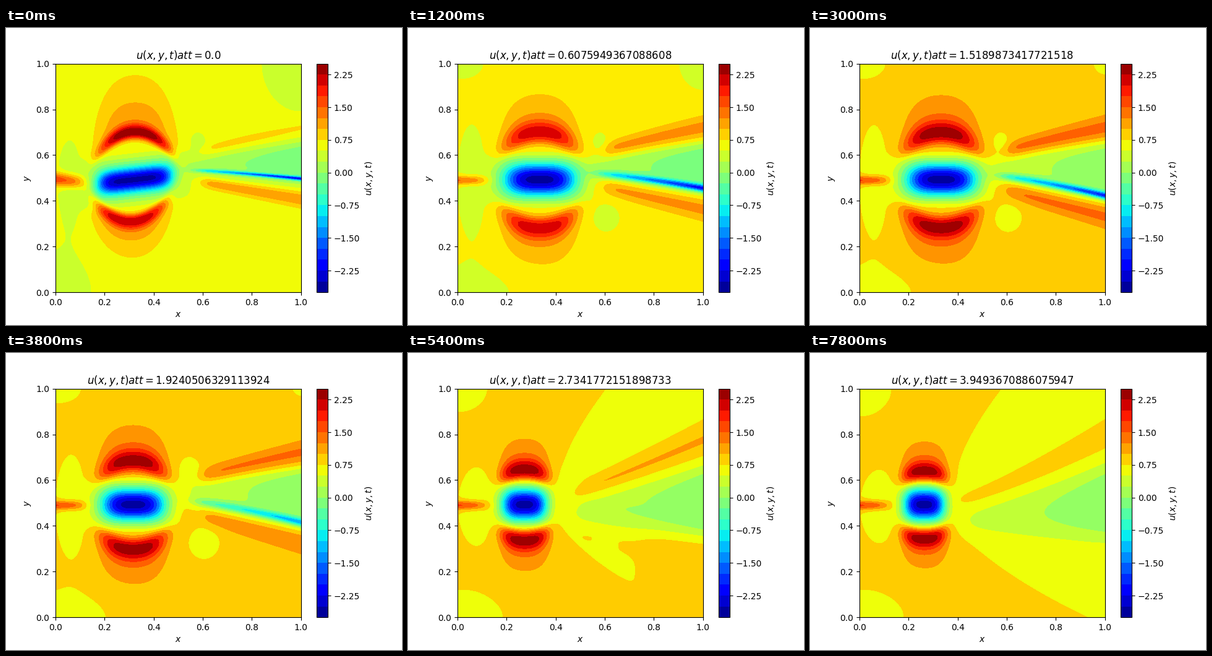
Animation of 640 by 480 pixels, one loop 8 s. Source, as a matplotlib script:

```python
import numpy as np
import matplotlib.pyplot as plt
from matplotlib.animation import FuncAnimation

FRAMES = 40
TIMES = np.linspace(0, 8, 80)

# first frame, lowest level, level step, bands, bottom of the background band
SCALES = [(0, -2.75, 0.25, 21, 0.50), (2, -2.5, 0.25, 20, 0.75),
          (6, -3.0, 0.3, 19, 0.60), (12, -3.0, 0.3, 18, 0.60)]
GAP = 0.13  # background height above its band's lower edge

x, y = np.meshgrid(np.linspace(0, 1, 181), np.linspace(0, 1, 181))


def smooth(k, a, b):
    t = np.clip((k - a) / (b - a), 0, 1)
    return t * t * (3 - 2 * t)


def early(k):
    """Initial transient, dying out."""
    return np.exp(-k / 1.2)


def shrink(k):
    """The central vortex pair contracts."""
    return smooth(k, 13, 31)


def late(k):
    """The wake spreads and reaches back to the core."""
    return smooth(k, 22, 30)


def sag(k):
    """Slow downward drift of the wake's end."""
    return 0.1 * (1 - np.exp(-k / 11))


def mix(a, b, w):
    return a + (b - a) * w


def sig(z):
    return 0.5 * (1 + np.tanh(z / 2))


def dip(cx, cy, rx, ry):
    """Shallow hollow whose visible edge is the ellipse rx, ry."""
    r2 = ((x - cx) / (rx + 1e-3)) ** 2 + ((y - cy) / (ry + 1e-3)) ** 2
    return -2 * GAP * 0.5 ** r2


def core(k, drop):
    e, s = early(k), shrink(k)
    cx = mix(0.335, 0.264, s) - 0.012 * e
    ax = mix(0.145, 0.082, s) + 0.01 * e
    ay = mix(0.07, 0.068, s) - 0.015 * e
    dx = np.abs(x - cx)
    dy = np.abs(y - 0.493 - 0.12 * e * np.clip(x - cx, -0.2, 0.2))
    blob = np.exp(-(dx / ax) ** (3.2 + 2.5 * e) - (dy / ay) ** 2.2)
    skirt = np.exp(-(dx / (1.4 * ax)) ** 6 - (dy / 0.11) ** 6)
    return -(drop - 0.5) * blob - 0.5 * skirt


def lobe(k, side):
    """Arched crest above (side 1) or below (side -1) the core."""
    e, s = early(k), shrink(k)
    below = side < 0
    cx = mix(0.335, 0.264, s) - e * (0.03 if below else 0.01)
    peak = mix(0.213, 0.15, s) - e * (0.03 if below else 0)
    ax = mix(0.143, 0.09, s)
    inner = mix(0.05, 0.045, s) - 0.018 * e
    outer = mix(0.047, 0.042, s) - 0.016 * e
    spread = mix(0.148, 0.117, s) + e * (-0.02 if below else 0.05)
    bend = mix(0.055, 0.03, s) + 0.025 * e

    r = np.abs(x - cx) / ax
    d = side * (y - 0.491) - peak + bend * np.minimum(r, 1.5) ** 2
    near = np.exp(-(np.abs(d) / inner) ** 2.6)
    crest = np.where(d > 0, np.exp(-(d / outer) ** 2), near)
    halo = np.where(d > 0, np.exp(-(d / spread) ** 2), near)
    height = 1.0 + e * (0.05 if below else 0.3)
    return (height * crest * np.exp(-r ** 4)
            + 0.55 * halo * np.exp(-(r / 1.12) ** 4))


def jet(k):
    e = early(k)
    d = (y - 0.49 + 0.12 * e * (x - 0.04)) / (0.018 + 0.01 * e)
    return (0.95 + 0.2 * e) * np.exp(-d ** 2 - (x / 0.115) ** 4)


def wake(k):
    e, s, w = early(k), shrink(k), late(k)
    x0 = mix(0.53, 0.40, w)
    t = np.clip((x - x0) / (1 - x0), 0, 1)
    tail = 0.497 - sag(k)

    # slow region between two edges
    upper = mix(mix(0.575, 0.455, w), 0.655, t ** mix(0.8, 1.3, w))
    lower = mix(mix(0.515 - 0.35 * sag(k), 0.39, w),
                mix(tail - 0.025, 0.345, w), t)
    soft = mix(0.015, 0.025, w)
    band = sig((upper - y) / soft) * sig((y - lower) / soft)
    depth = (0.9 - 0.1 * e) * (0.6 + 0.4 * t) * sig((x - x0) / 0.02)
    u = -depth * band

    # thin jet line
    mid = mix(0.535 - 0.3 * sag(k), tail, t ** 1.3)
    width = mix(0.017, 0.025, s) - 0.008 * e
    strength = 2.4 * (1 - s) ** 1.6 * (0.4 + 0.6 * t)
    u -= strength * sig((x - x0 - 0.04) / 0.02) * np.exp(
        -((y - mid) / width) ** 2)

    # fast streaks on both sides
    shift = mix(0.02, 0.055, w) + mix(0.045, 0.09, w) * t
    width = mix(0.03, 0.02, w) + mix(0.02, 0.045, w) * t
    width = width * (1 - 0.35 * e)
    start = sig((x - mix(0.6, 0.43, w)) / 0.015)
    top = mix(0.6, 0.33, s) - 0.38 * e
    bottom = 0.57 * (1 - s)
    for height, line in ((top, upper + shift), (bottom, lower - shift)):
        u += height * start * np.exp(-((y - line) / width) ** 2)
    return u, band


def far_field(k):
    """Slower flow that fills the right-hand side at the end."""
    up = np.clip((y - 0.6) / 0.4, 0, 1)
    down = np.clip((0.45 - y) / 0.45, 0, 1)
    edge = 0.385 + 0.19 * up ** 1.5 + 0.54 * down ** 1.6
    reach = 0.76 + 0.3 * np.clip((k - 31) / 8, 0, 1)
    limit = np.where(y < 0.45, sig((reach - x) / 0.03), 1)
    return -0.25 * late(k) * sig((x - edge) / 0.025) * limit


def hollows(k):
    e, s, w = early(k), shrink(k), late(k)
    fade = 1 - w
    r = 0.03 + 0.07 * s
    return (dip(mix(0.058, 0.08, s), 0.485, mix(0.06, 0.078, s) - 0.01 * e,
                mix(0.25, 0.16, s) - 0.07 * e)
            + dip(mix(0.58, 0.44, s), mix(0.66, 0.58, s), r * fade,
                  1.3 * r * fade)
            + dip(0.605, 0.325, (0.055 + 0.03 * s) * fade * (1 - e),
                  (0.06 + 0.04 * s) * fade * (1 - e))
            # corners
            + dip(0, 0, mix(0.215, 0.18, s) - 0.07 * e,
                  mix(0.1, 0.118, s) + 0.07 * e)
            + dip(0, 1, (0.1 + 0.03 * w) * (1 - e),
                  (0.06 + 0.06 * w) * (1 - e))
            + dip(1, 1, 0.16 * np.exp(-k / 12), 0.21 * np.exp(-k / 10)))


def field(k, low, floor):
    base = floor + GAP
    stream, band = wake(k)
    return (base + core(k, base - low - 0.14) + lobe(k, 1) + lobe(k, -1)
            + jet(k) + stream + far_field(k) * (1 - band) + hollows(k))


def draw(k):
    ax.clear()
    _, low, step, bands, floor = [s for s in SCALES if s[0] <= k][-1]
    levels = low + step * np.arange(bands + 1)
    u = np.clip(field(k, low, floor), levels[0] + 1e-3, levels[-1] - 1e-3)
    filled = ax.contourf(x, y, u, levels, cmap="jet")
    ax.set_xlabel("$x$")
    ax.set_ylabel("$y$")
    ax.set_title(f"$u(x,y,t) at t = {TIMES[k]}$", pad=5.3)
    return filled


fig, ax = plt.subplots(figsize=(6.4, 4.8), dpi=100)
fig.colorbar(draw(0), ax=ax, label="$u(x,y,t)$")

anim = FuncAnimation(fig, draw, frames=FRAMES, init_func=lambda: None,
                     interval=200, repeat=True, repeat_delay=0)
plt.show()
```
